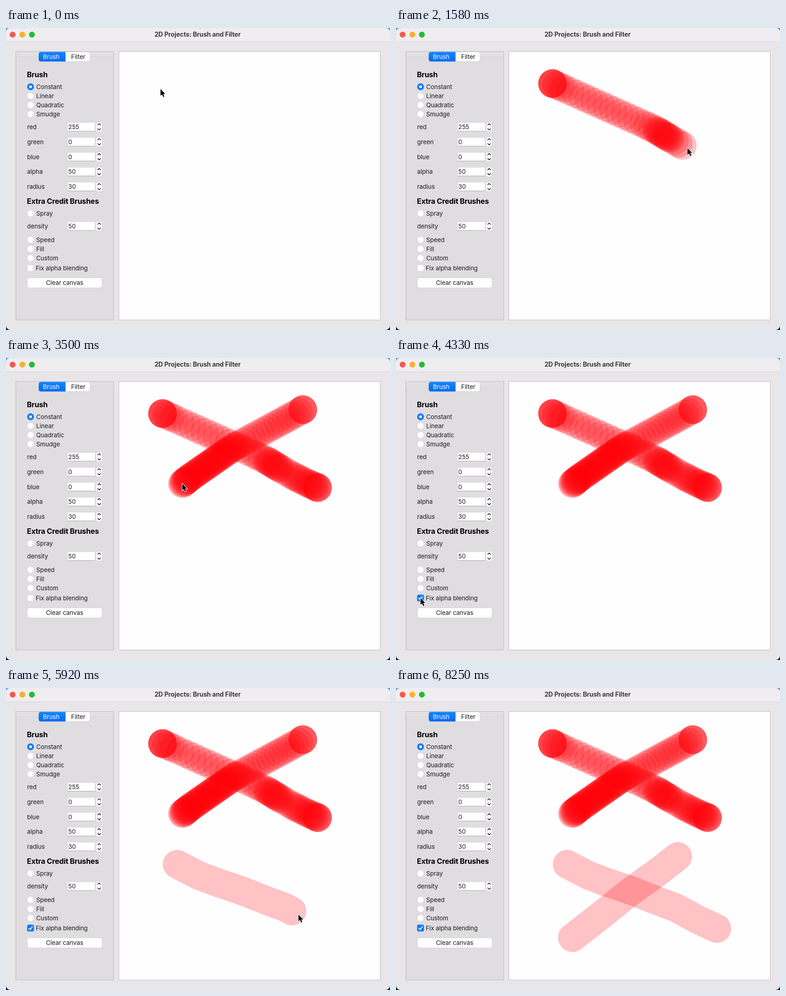
Animation, 845 px wide and 663 px high, one loop 8.41 s. Source, as an HTML page with a canvas:

```html
<!DOCTYPE html>
<html lang="en">
<head>
<meta charset="utf-8">
<title>Brush and Filter</title>
<style>
  html, body { margin: 0; width: 100%; height: 100%; overflow: hidden; }
  body { background: linear-gradient(#5c9fd0 50%, #10222e 50%); }
  svg, canvas { position: absolute; left: 0; top: 0; }
  text { font: 13.5px Inter, sans-serif; letter-spacing: -.1px; fill: #1b1a1b; }
  .bold { font-weight: 700; font-size: 13.9px; fill: #3b393b; }
  .head { font-weight: 700; font-size: 16.2px; letter-spacing: -.2px; fill: #000; }
  .mid { text-anchor: middle; }
  .control { fill: #fff; stroke: #c9c7ca; stroke-width: .7; }
  .line { fill: none; stroke: #1b1a1b; stroke-width: 1.6; stroke-linecap: round; stroke-linejoin: round; }
</style>
</head>
<body>
<svg id="ui" width="845" height="663"></svg>
<canvas id="paint" width="845" height="663"></canvas>
<script>
const LOOP = 8410, FPS = 12, EVENT = 1 / 60, RADIUS = 31.5;
const RED = 'rgba(255,0,10,.235)';

// ---------- window ----------
const rect = (x, y, w, h, r, attrs) =>
  `<rect x="${x}" y="${y}" width="${w}" height="${h}" rx="${r}" ${attrs}/>`;
const circle = (x, y, r, attrs) => `<circle cx="${x}" cy="${y}" r="${r}" ${attrs}/>`;
const label = (x, y, s, cls = '') => `<text x="${x}" y="${y + 5}" class="${cls}">${s}</text>`;

const radio = (y, name, on) => (on
  ? circle(54, y, 7.5, 'fill="#087aff"') + circle(54, y, 3, 'fill="#fff"')
  : circle(54, y, 7.4, 'class="control"')) + label(66.5, y, name);

const spinner = (y, name, value) => label(46.5, y, name)
  + rect(135.5, y - 9.5, 60.5, 19, 0, 'fill="#fff" stroke="#d0ced1" stroke-width=".7"')
  + `<path d="M135.5 ${y + 9.5}h60.5" stroke="#aaa8ab"/>`
  + label(137, y, value)
  + rect(198, y - 10.5, 13.5, 21.5, 5.5, 'class="control"')
  + `<path class="line" d="M202 ${y - 4}l3-3l3 3M202 ${y + 4}l3 3l3-3"/>`;

document.getElementById('ui').innerHTML = `
  <defs><linearGradient id="blue" x2="0" y2="1">
    <stop stop-color="#1685ff"/><stop offset="1" stop-color="#066af5"/></linearGradient></defs>`
  + rect(0, 0, 845, 663, 10, 'fill="#e8e6e8"')
  + '<path d="M0 30V10Q0 0 10 0H835Q845 0 845 10V30Z" fill="#f0edf0"/>'
  + '<path d="M0 30.5H845" stroke="#d3d1d3"/>'
  + circle(14.5, 14.5, 6.5, 'fill="#fc5650"')
  + circle(36, 14.5, 6.5, 'fill="#f8b02c"')
  + circle(57, 14.5, 6.5, 'fill="#1fbd36"')
  + label(421.5, 14, '2D Projects: Brush and Filter', 'bold mid')
  + rect(21.5, 51.5, 215.5, 589.5, 0, 'fill="#e2e0e3" stroke="#bcbabd"')
  + rect(22.5, 62.5, 213.5, 577.5, 3, 'fill="#dfdde0" stroke="#d6d4d7"')
  + rect(248.5, 51.5, 575, 589.5, 0, 'fill="#fffeff" stroke="#bcbabd"')
  + rect(72, 52.5, 113, 21, 5, 'class="control"')
  + '<path d="M131 52.5H77q-5 0-5 5v11q0 5 5 5h54z" fill="url(#blue)"/>'
  + `<g style="--c:#fff">${label(99.5, 63, 'Brush', 'mid').replace('<text', '<text style="fill:#fff"')}</g>`
  + label(159, 63, 'Filter', 'mid')
  + label(46, 103, 'Brush', 'head')
  + ['Constant', 'Linear', 'Quadratic', 'Smudge'].map((s, i) => radio(129 + 20 * i, s, !i)).join('')
  + [['red', 255], ['green', 0], ['blue', 0], ['alpha', 50], ['radius', 30]]
      .map(([s, v], i) => spinner(217 + 32.8 * i, s, v)).join('')
  + label(46, 381, 'Extra Credit Brushes', 'head')
  + radio(407, 'Spray') + spinner(435, 'density', 50)
  + ['Speed', 'Fill', 'Custom'].map((s, i) => radio(465 + 20 * i, s)).join('')
  + rect(47, 520, 14, 14, 3.5, 'class="control"')
  + '<g id="check">' + rect(46.5, 519.5, 15, 15, 3.5, 'fill="#087aff"')
  + '<path class="line" style="stroke:#fff;stroke-width:2" d="M50.5 527.5l2.7 3.2l4.6-7"/></g>'
  + label(65.5, 527, 'Fix alpha blending')
  + rect(47, 548.5, 164.5, 22, 5, 'class="control"')
  + label(129, 559, 'Clear canvas', 'mid');

// ---------- brush strokes ----------
// Each leg [x, y, n] adds n mouse events, evenly spaced up to (x, y).
function makeStroke(press, start, x, y, legs) {
  const events = [{ t: press, x, y }];
  for (const [toX, toY, n] of legs) {
    const from = events.at(-1);
    for (let i = 1; i <= n; i++) {
      events.push({
        t: start + events.length * EVENT,
        x: from.x + (toX - from.x) * i / n,
        y: from.y + (toY - from.y) * i / n
      });
    }
  }
  return events;
}

const strokes = [
  makeStroke(.83, 1, 344, 122, [[345, 122, 4], [370, 133, 3], [545, 211, 13], [572, 224, 3],
    [604, 243, 9], [630, 258, 3], [664, 275, 6], [685, 284, 5], [686, 285, 3]]),
  makeStroke(2.33, 2.4833, 653, 113, [[653, 114, 3], [581, 153, 8], [512, 190, 7], [490, 203, 4],
    [404, 263, 26], [388, 276, 8]]),
  makeStroke(5.15, 5.3, 376.5, 387, [[425, 412, 7], [465, 427, 7], [516, 444, 7], [572, 466, 7],
    [615, 482, 7], [665, 509, 7], [706, 528, 7]]),
  makeStroke(6.83, 6.9833, 620, 370, [[579, 402, 6], [558, 417, 3], [512, 450, 8],
    [454, 497, 10], [388, 548, 13]])
];

// The pointer runs slightly ahead of the paint.
const LEAD = 2 * EVENT;
const key = (t, x, y) => ({ t, x, y });
const follow = i => strokes[i].map((e, n) => key(n ? e.t - LEAD : e.t, e.x, e.y));
const track = [
  key(0, 340, 134), key(.3, 340, 134), key(.8, 344, 122), ...follow(0),
  key(1.88, 686, 285), key(2.28, 653, 113), ...follow(1),
  key(3.5, 388, 276), key(3.82, 54, 527), key(4.56, 54, 527), key(5.08, 376.5, 387), ...follow(2),
  key(6.2, 706, 528), key(6.75, 620, 370), ...follow(3)
];

function pointerAt(t) {
  const i = track.findIndex(k => k.t > t);
  if (i < 0) return track.at(-1);
  const a = track[i - 1], b = track[i];
  const u = (t - a.t) / (b.t - a.t), s = u * u * (3 - 2 * u);
  return { x: a.x + (b.x - a.x) * s, y: a.y + (b.y - a.y) * s };
}

// ---------- drawing ----------
const ctx = document.getElementById('paint').getContext('2d');
const check = document.getElementById('check');
const arrow = new Path2D('M0 0V14.8L3.4 11.6L5.9 17.4L8.4 16.3L5.9 10.7H10.4Z');

function drawStamps(events) {
  ctx.fillStyle = RED;
  for (const { x, y } of events) {
    ctx.beginPath();
    ctx.arc(x, y, RADIUS, 0, 2 * Math.PI);
    ctx.fill();
  }
}

function drawBlended(events) {
  if (!events.length) return;
  ctx.strokeStyle = RED;
  ctx.lineWidth = 2 * RADIUS;
  ctx.lineCap = ctx.lineJoin = 'round';
  ctx.beginPath();
  ctx.moveTo(events[0].x, events[0].y);
  for (const { x, y } of events) ctx.lineTo(x, y);
  ctx.stroke();
}

function drawPointer(t) {
  const { x, y } = pointerAt(t);
  ctx.save();
  ctx.globalAlpha = Math.max(0, Math.min(1, (8.25 - t) * 3));
  ctx.translate(x, y);
  ctx.lineJoin = 'miter';
  ctx.lineWidth = 2;
  ctx.strokeStyle = '#fff';
  ctx.stroke(arrow);
  ctx.fillStyle = '#000';
  ctx.fill(arrow);
  ctx.restore();
}

function render(now) {
  const t = Math.floor((now % LOOP + 5) * FPS / 1000) / FPS;
  ctx.clearRect(0, 0, 845, 663);
  strokes.forEach((events, i) => {
    const done = events.filter(e => e.t <= t + .001);
    (i < 2 ? drawStamps : drawBlended)(done);
  });
  check.style.display = t >= 4.24 ? '' : 'none';
  drawPointer(t);
}

const began = performance.now();
function tick() {
  render(performance.now() - began);
  requestAnimationFrame(tick);
}
tick();
</script>
</body>
</html>
```
